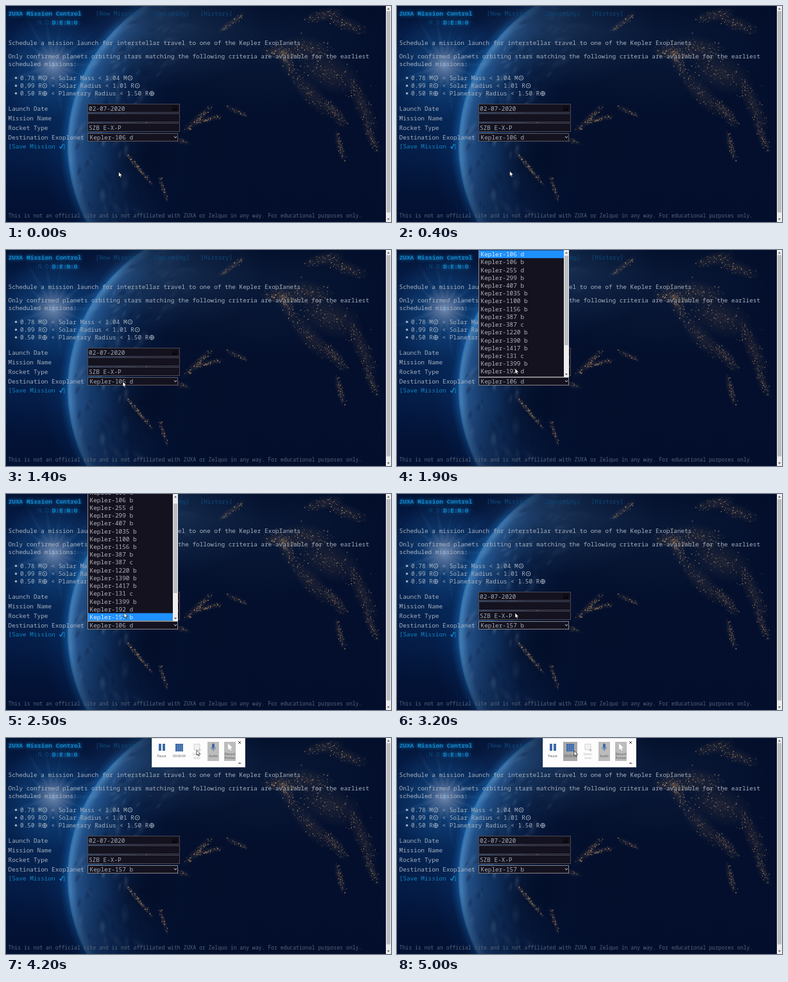
These frames come from a looping animation (600 px wide and 338 px high, 5100 ms). An HTML page with a canvas:

```html
<!DOCTYPE html>
<html lang="en">
<head>
<meta charset="utf-8">
<title>Mission Control</title>
<style>
html, body { margin: 0; width: 100%; height: 100%; overflow: hidden; background: #030f2c; }
canvas { display: block; }
</style>
</head>
<body>
<canvas id="stage" width="600" height="338"></canvas>
<script>
const W = 600, H = 338, LOOP = 5100;
const CHAR = 5.638, SIZE = CHAR / 0.6;
const MONO = '"Noto Sans Mono", "DejaVu Sans Mono", monospace';
const SANS = '"Open Sans", sans-serif';
const BODY = '#a6b0be', CYAN = '#1184c4', DIM = '#0d4a7c', PANEL = '#14121f';
const PLANETS = ('106 d,106 b,255 d,299 b,407 b,1035 b,1100 b,1156 b,387 b,387 c,' +
  '1220 b,1390 b,1417 b,131 c,1399 b,192 d,157 b,1410 b').split(',').map(n => 'Kepler-' + n);
const ROW = 12.22;
const OPEN = 1500, HOVER = 2000, SCROLL = 2500, PICK = 3100, TOOLBAR = 3800;
const EARTH = { x: 356, y: 218, r: 260 }, SUN = { x: 74, y: 92 };

// Pointer tip: time, x, y
const PATH = [
  [0, 175.5, 259.5], [350, 175.5, 259.5], [900, 181.5, 210], [1250, 182, 206],
  [1500, 182, 206], [1850, 184, 185.5], [3250, 184, 186], [3900, 290, 12],
  [4200, 297, 19], [4500, 297, 19], [4900, 276, 20], [LOOP, 276, 20]
];
// Strips of city lights: x1, y1, x2, y2, spread, count
const LIGHTS = [
  [405, 70, 455, 78, 8, 180], [425, 58, 445, 105, 9, 150], [440, 60, 500, 72, 14, 130],
  [470, 20, 520, 8, 8, 70], [505, 18, 555, 38, 9, 90], [470, 90, 540, 120, 22, 170],
  [450, 110, 500, 165, 12, 110], [500, 150, 527, 185, 8, 110], [515, 200, 526, 240, 5, 90],
  [540, 120, 570, 190, 10, 130], [560, 185, 578, 225, 6, 80], [335, 38, 368, 14, 4, 90],
  [280, 195, 318, 158, 5, 110], [295, 182, 335, 172, 4, 80], [345, 158, 375, 172, 4, 40],
  [170, 187, 235, 184, 3, 60], [187, 230, 226, 278, 3, 130], [240, 268, 250, 302, 3, 70],
  [255, 205, 285, 215, 4, 40]
];

const stage = document.getElementById('stage');
let g = stage.getContext('2d');

function box(x, y, w, h, fill, stroke) {
  g.fillStyle = fill;
  g.fillRect(x, y, w, h);
  if (stroke) {
    g.strokeStyle = stroke;
    g.lineWidth = 1;
    g.strokeRect(x + .5, y + .5, w - 1, h - 1);
  }
}

function text(str, x, y, color = BODY, size = SIZE, weight = 400) {
  g.font = `${weight} ${size}px ${MONO}`;
  g.fillStyle = color;
  g.fillText(str, x, y);
}

function shape(points, fill, stroke, width = .7) {
  g.beginPath();
  points.forEach(([x, y]) => g.lineTo(x, y));
  if (fill) { g.closePath(); g.fillStyle = fill; g.fill(); }
  if (stroke) { g.strokeStyle = stroke; g.lineWidth = width; g.stroke(); }
}

function gradient(grad, stops) {
  stops.forEach(([at, color]) => grad.addColorStop(at, color));
  g.fillStyle = grad;
  g.fillRect(0, 0, W, H);
}

function glow(x, y, r, color, squash = 1, turn = 0) {
  g.save();
  g.translate(x, y);
  g.rotate(turn);
  g.scale(1, squash);
  const grad = g.createRadialGradient(0, 0, 0, 0, 0, r);
  grad.addColorStop(0, `rgba(${color})`);
  grad.addColorStop(1, `rgba(${color.replace(/[\d.]+$/, '0')})`);
  g.fillStyle = grad;
  g.fillRect(-r, -r, 2 * r, 2 * r);
  g.restore();
}

function drawSpace() {
  let seed = 11;
  const random = () => (seed = seed * 16807 % 2147483647) / 2147483647;
  const bell = () => random() + random() + random() - 1.5;
  const { x, y, r } = EARTH;

  box(0, 0, W, H, '#03143a');
  glow(50, 140, 150, '10,62,120,.5', 1.1);
  gradient(g.createRadialGradient(x, y, r - 6, x, y, r + 42),
    [[0, 'rgba(28,105,175,.8)'], [.15, 'rgba(20,90,160,.65)'], [.4, 'rgba(8,55,115,.25)'], [1, 'rgba(8,50,110,0)']]);
  g.save();
  g.beginPath();
  g.arc(x, y, r, 0, 7);
  g.clip();
  gradient(g.createRadialGradient(x + 65, y, 80, x, y, r),
    [[0, '#030f2c'], [.45, '#041335'], [.7, '#0b254e'], [.85, '#153a6a'], [.94, '#234f86'], [.985, '#417bb2'], [1, '#2c6cac']]);
  for (let i = 0; i < 170; i++) {
    const a = 2.5 + random() * 1.9, d = r - 4 - random() * 95;
    glow(x + d * Math.cos(a), y + d * Math.sin(a), 4 + random() * 15,
      i % 2 ? '125,155,190,.2' : '3,18,50,.32', .4, a + 1.2 + random());
  }
  g.restore();
  gradient(g.createLinearGradient(170, 0, 400, 0),
    [[0, 'rgba(3,15,43,0)'], [.55, 'rgba(3,15,43,.7)'], [1, '#030f2c']]);
  glow(255, 25, 150, '48,80,118,.4', .7);
  glow(400, 60, 190, '25,50,86,.28', .6);
  glow(215, 240, 60, '1,9,28,.5', 1.2);
  gradient(g.createLinearGradient(0, 240, 0, H), [[0, 'rgba(2,14,44,0)'], [1, 'rgba(2,14,44,.55)']]);
  gradient(g.createLinearGradient(0, 0, 0, 40), [[0, 'rgba(2,14,40,.4)'], [1, 'rgba(2,14,40,0)']]);

  glow(SUN.x, SUN.y, 85, '30,105,175,.5');
  glow(SUN.x, SUN.y, 36, '150,145,170,.65');
  for (let i = 0; i < 9; i++) glow(SUN.x, SUN.y, 60 + random() * 40, '110,160,205,.16', .05, i * .35);

  for (const [x1, y1, x2, y2, spread, count] of LIGHTS) {
    const length = Math.hypot(x2 - x1, y2 - y1);
    glow((x1 + x2) / 2, (y1 + y2) / 2, length * .7, '150,110,75,.17',
      spread * 2 / length, Math.atan2(y2 - y1, x2 - x1));
    for (let i = 0; i < count; i++) {
      const p = random(), s = .5 + random() * .9;
      g.fillStyle = `rgba(232,180,120,${.12 + .8 * random() ** 2})`;
      g.fillRect(x1 + (x2 - x1) * p + bell() * spread, y1 + (y2 - y1) * p + bell() * spread, s, s);
    }
  }
}

// Writes a criterion; "@" is the solar sign and "+" the earth sign.
function criterion(str, y) {
  g.beginPath();
  g.arc(15.5, y - 3.4, 1.8, 0, 7);
  g.fillStyle = BODY;
  g.fill();
  let x = 22;
  for (const part of str.split(/([@+])/)) {
    if (part !== '@' && part !== '+') {
      text(part, x, y);
      x += part.length * CHAR;
      continue;
    }
    const cx = x + 4.5, cy = y - 3.3;
    g.strokeStyle = BODY;
    g.lineWidth = 1;
    g.beginPath();
    g.arc(cx, cy, 3.4, 0, 7);
    if (part === '+') {
      g.moveTo(cx - 3.4, cy); g.lineTo(cx + 3.4, cy);
      g.moveTo(cx, cy - 3.4); g.lineTo(cx, cy + 3.4);
    }
    g.stroke();
    if (part === '@') box(cx - .8, cy - .8, 1.6, 1.6, BODY);
    x += 9;
  }
}

function scrollbar(x, bottom, thumbTop, thumbEnd) {
  box(x, 0, 8, bottom, '#ededee');
  box(x + 1, thumbTop, 6, thumbEnd - thumbTop, '#bcbdc0');
  shape([[x + 2, 5.5], [x + 4, 3], [x + 6, 5.5]], '#555');
  shape([[x + 2, bottom - 5.5], [x + 4, bottom - 3], [x + 6, bottom - 5.5]], '#555');
}

function drawPage() {
  drawSpace();
  g.shadowColor = '#0b8fe0';
  g.shadowBlur = 5;
  text('ZUXA Mission Control', 3.5, 15, CYAN, 9.5, 700);
  text('D:E:N:O', 72, 28.8, CYAN, SIZE, 700);
  g.shadowBlur = 0;
  text(':N:O:', 44, 28.8, DIM);
  text(':', 111.5, 28.8, DIM);
  text('[New Mission]', 139.5, 15, DIM);
  text('[Upcoming]', 229.5, 15, DIM);
  text('[History]', 302.5, 15, DIM);
  text('Schedule a mission launch for interstellar travel to one of the Kepler Exoplanets.', 3.5, 61);
  text('Only confirmed planets orbiting stars matching the following criteria are available for the earliest', 3.5, 81.8);
  text('scheduled missions:', 3.5, 93.5);
  criterion('0.78 M@ < Solar Mass < 1.04 M@', 115.9);
  criterion('0.99 R@ < Solar Radius < 1.01 R@', 128.1);
  criterion('0.50 R+ < Planetary Radius < 1.50 R+', 140.2);
  ['Launch Date', 'Mission Name', 'Rocket Type', 'Destination Exoplanet']
    .forEach((label, i) => text(label, 3.5, 164.4 + i * 15));
  ['02-07-2020', '', 'SZB E-X-P'].forEach((value, i) => {
    box(127, 153 + i * 15, 144, 14, PANEL, '#4d484f');
    text(value, 129, 164.4 + i * 15);
  });
  box(259, 157, 8, 7, '#07070b');
  box(260, 159, 6, .7, '#24222c');
  text('[Save Mission', 3.5, 223.2, CYAN);
  text(']', 3.5 + 15 * CHAR, 223.2, CYAN);
  shape([[83.5, 220], [85.5, 222.8], [89, 215.8]], null, CYAN, 1.6);
  text('This is not an official site and is not affiliated with ZUXA or Zelquo in any way. For educational purposes only.',
    3.5, 331.3, '#56657a', 8.14);
  scrollbar(592, H, 8, 323);
}

function drawSelect(t) {
  box(127, 199, 141, 13, PANEL, t < OPEN ? '#5f5a5d' : '#858589');
  text(PLANETS[t < PICK ? 0 : 16], 130.5, 209.2);
  shape([[262, 204], [264, 206.3], [266, 204]], null, '#d5d5d5', 1);
}

function drawList(t) {
  const scrolled = t >= SCROLL;
  const active = t < HOVER ? 0 : scrolled ? 16 : 15;
  const top = scrolled ? -9.1 : .5;
  g.save();
  g.beginPath();
  g.rect(127, 0, 141, 199);
  g.clip();
  box(127, 0, 141, 199, PANEL);
  PLANETS.forEach((name, i) => {
    const y = top + i * ROW;
    if (i === active) box(128, y, 132, ROW, '#1e90ff');
    text(name, 130.5, y + 9.6, i === active ? '#e4eefa' : '#b4b4b9');
  });
  scrollbar(260, 199, scrolled ? 15 : 9, scrolled ? 155 : 149);
  g.restore();
  box(127, 0, 1, 212, '#8b8b90');
  box(127, 198, 133, 1, '#8b8b90');
}

function caption(str, x, y, color = '#555') {
  g.font = `5px ${SANS}`;
  g.textAlign = 'center';
  g.fillStyle = color;
  g.fillText(str, x, y);
  g.textAlign = 'left';
}

function drawToolbar(t) {
  const blue = '#3d6aa8', stopHover = t >= 4700;
  box(227, 0, 146, 46, '#fdfdfd', '#d4d6da');
  box(238, 9, 4, 11, blue);
  box(244, 9, 4, 11, blue);
  caption('Pause', 242.5, 30);
  if (stopHover) box(259, 6, 22, 30, '#a9a9a9');
  box(264, 9, 12, 12, blue);
  for (let i = 1; i < 4; i++) {
    box(264, 9 + i * 3, 12, .5, '#6e90c0');
    box(264 + i * 3, 9, .5, 12, '#6e90c0');
  }
  caption('00:00:0' + Math.floor(t / 1000), 270, 30);
  g.setLineDash([1.5, 1]);
  box(292.5, 9, 10, 10, '#f1f1f1', '#c4c4c4');
  g.setLineDash([]);
  shape([[299, 19], [304, 19]], null, '#b5b5b5', 1);
  shape([[301.5, 16.5], [301.5, 21.5]], null, '#b5b5b5', 1);
  caption('Select', 297.5, 27, '#b5b5b5');
  caption('Area', 297.5, 33, '#b5b5b5');
  box(314, 6, 18, 30, '#bcbcbc');
  g.fillStyle = blue;
  g.beginPath();
  g.roundRect(321, 8.5, 4, 8, 2);
  g.fill();
  g.strokeStyle = blue;
  g.lineWidth = .8;
  g.beginPath();
  g.arc(323, 14.5, 3.5, 0, Math.PI);
  g.moveTo(323, 18); g.lineTo(323, 20.5);
  g.stroke();
  caption('Audio', 323, 30);
  box(340, 6, 18, 30, '#bcbcbc');
  arrow(346, 8.5, 1.2, null);
  caption('Record', 349, 27);
  caption('Pointer', 349, 33);
  shape([[362, 5], [366, 9]], null, '#444', 1);
  shape([[366, 5], [362, 9]], null, '#444', 1);
  shape([[362, 39.5], [364, 38], [364, 41]], '#555');
  box(364, 39, 2.5, 1, '#555');
}

function arrow(x, y, scale, outline) {
  g.save();
  g.translate(x, y);
  g.scale(scale, scale);
  const points = [[0, 0], [0, 8], [1.8, 6.4], [3, 9.2], [4.4, 8.6], [3.2, 5.9], [5.7, 5.7], [0, 0]];
  shape(points, '#fff', outline);
  g.restore();
}

function drawPointer(t) {
  const i = PATH.findIndex(p => p[0] > t);
  const [t0, x0, y0] = PATH[i - 1], [t1, x1, y1] = PATH[i];
  const p = (t - t0) / (t1 - t0), ease = p * p * (3 - 2 * p);
  arrow(x0 + (x1 - x0) * ease, y0 + (y1 - y0) * ease, 1, '#111');
}

// The still part of the page is painted once.
const screen = g;
const page = document.createElement('canvas');
page.width = W;
page.height = H;
g = page.getContext('2d');
drawPage();
g = screen;

function frame() {
  const t = performance.now() % LOOP;
  g.drawImage(page, 0, 0);
  drawSelect(t);
  if (t >= OPEN && t < PICK) drawList(t);
  if (t >= TOOLBAR) drawToolbar(t);
  drawPointer(t);
  requestAnimationFrame(frame);
}
frame();
</script>
</body>
</html>
```
